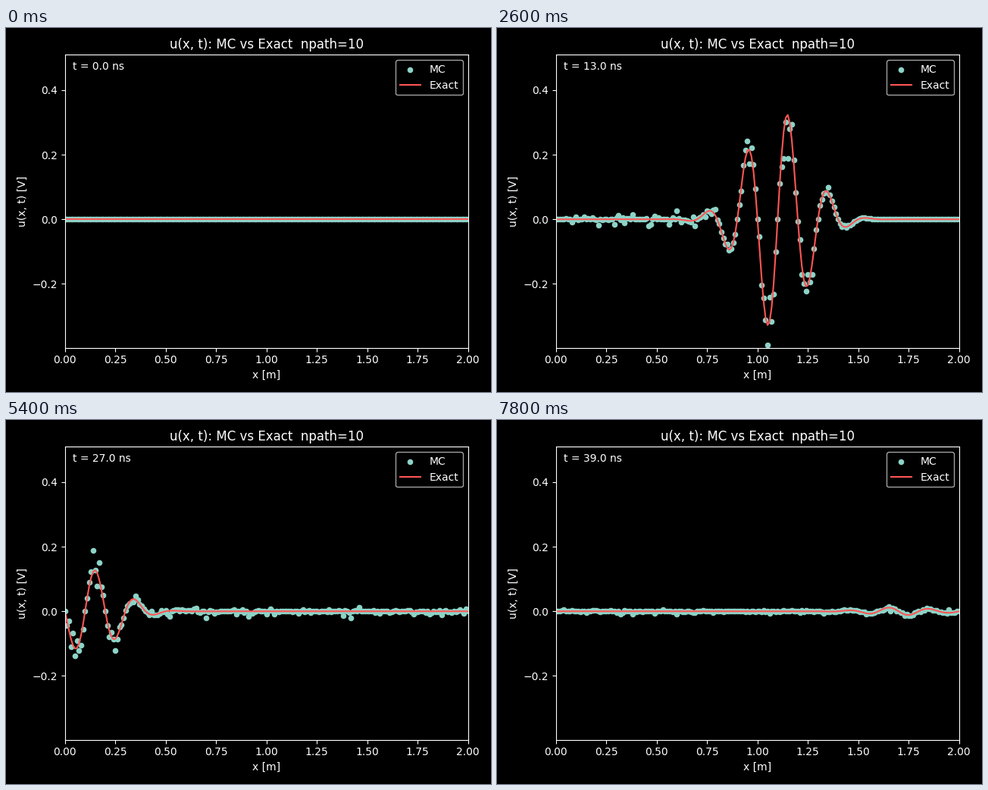
Animation of 640x480 px, one loop 8000 ms. Source, as a matplotlib script:

```python
import numpy as np
import matplotlib.pyplot as plt
from matplotlib.animation import FuncAnimation

FRAMES, INTERVAL = 40, 200
LENGTH, SPEED = 2.0, 0.2             # m, m/ns
LOSS, KICK = 0.137, -0.7             # scattering rate per metre, weight per event
GAIN, R_SRC, R_LOAD = 0.4, 0.2, -0.6
PEAK, WIDTH = 7.5, 0.75              # pulse centre and sigma, ns
NPATH = 10

x = np.linspace(0, LENGTH, 201)


def pulse(t):
    return GAIN * np.sin(2 * np.pi * t) * np.exp(-((t - PEAK) / WIDTH) ** 2 / 2)


def exact(t):
    """Sum of the direct wave and its echoes from both ends."""
    u = np.zeros_like(x)
    for n in range(3):
        there = 2 * LENGTH * n + x
        back = 2 * LENGTH * (n + 1) - x
        for dist, refl in ((there, 1), (back, R_LOAD)):
            u += (refl * (R_SRC * R_LOAD) ** n * np.exp(-LOSS * dist)
                  * pulse(t - dist / SPEED))
    return u


def monte_carlo(t, seed):
    """Trace random paths back in time from every x, in both directions."""
    rng = np.random.default_rng(seed)
    shape = (2, NPATH, x.size)
    pos = np.broadcast_to(x, shape).copy()
    left = np.zeros(shape, bool)
    left[0] = True
    time = np.full(shape, float(t))
    weight = np.ones(shape)
    total = np.zeros(shape)
    while (time > 0).any():
        wall = np.where(left, pos, LENGTH - pos)
        free = rng.exponential(1 / LOSS, shape)
        hit = free >= wall
        step = np.minimum(free, wall)
        time -= step / SPEED
        pos = np.clip(pos + np.where(left, -step, step), 0, LENGTH)
        at_src = hit & left
        total += np.where(at_src & (time > 0), weight * pulse(time), 0)
        weight *= np.where(hit, np.where(left, R_SRC, R_LOAD), KICK)
        left = ~left
    return total.sum(axis=0).mean(axis=0)


plt.style.use("dark_background")
plt.rcParams["font.family"] = "DejaVu Sans"
fig, ax = plt.subplots(figsize=(6.4, 4.8), dpi=100)
dots = ax.scatter(x, np.zeros_like(x), s=20, color="#8dd3c7", label="MC")
line, = ax.plot(x, np.zeros_like(x), color="#ff5555", lw=1.5, label="Exact")
ax.set_xlim(0, LENGTH)
ax.set_ylim(-0.398, 0.5095)
ax.set_xlabel("x [m]")
ax.set_ylabel("u(x, t) [V]")
ax.set_title(f"u(x, t): MC vs Exact  npath={NPATH}")
ax.legend(loc="upper right")
clock = ax.text(0.02, 0.95, "", transform=ax.transAxes)
fig.tight_layout()
fig.subplots_adjust(top=1 - 35.3 / 480)


def draw(i):
    dots.set_offsets(np.column_stack([x, monte_carlo(i, 100 + i)]))
    line.set_ydata(exact(i))
    clock.set_text(f"t = {i:.1f} ns")
    return dots, line, clock


anim = FuncAnimation(fig, draw, frames=FRAMES, interval=INTERVAL,
                     init_func=lambda: draw(0), repeat=True, repeat_delay=0)
plt.show()
```
